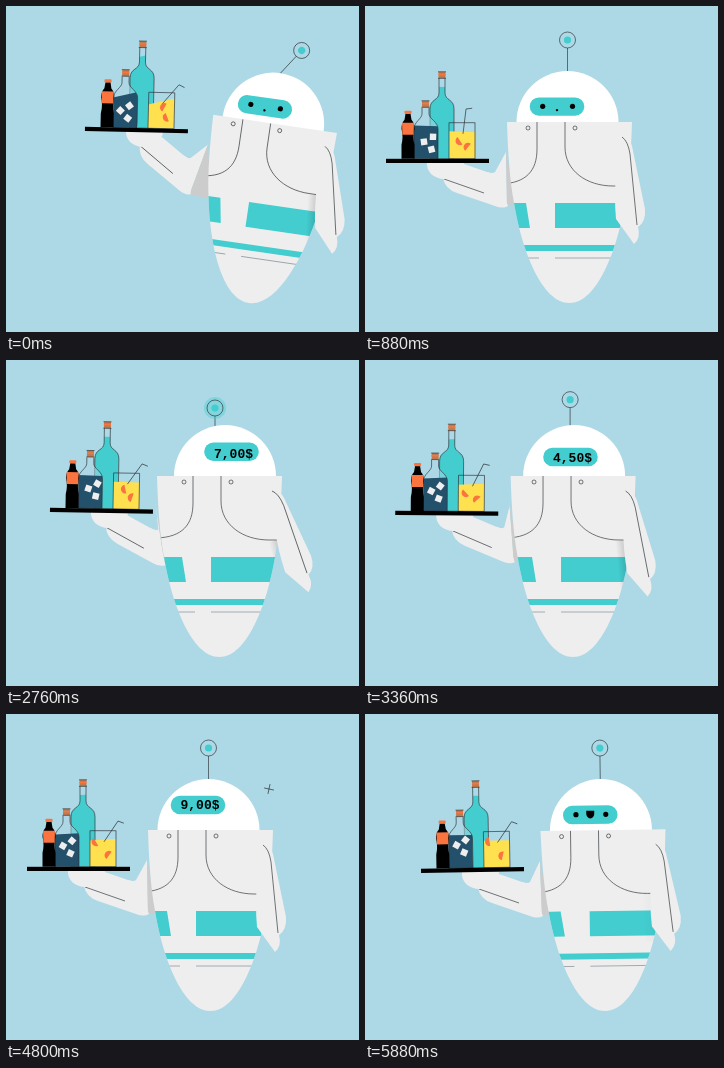
An HTML page that plays this animation: 353x326 px, repeating every 5.92 s.

```html
<!DOCTYPE html>
<html lang="en">
<head>
<meta charset="utf-8">
<title>Robot waiter</title>
<style>
  html, body { margin: 0; width: 100%; height: 100%; overflow: hidden; background: #add8e6; }
  svg { display: block; width: 353px; height: 326px; }
  .line { fill: none; stroke: #2a2f33; stroke-width: .65; }
  .shell { fill: #eee; }
  .teal { fill: #43cdcf; }
  .orange { fill: #fa7440; }
  .cork { fill: #c07a50; }
  #price { font: bold 13px "Liberation Mono", "DejaVu Sans Mono", monospace; text-anchor: middle; }
</style>
</head>
<body>
<svg viewBox="0 0 353 326">
  <defs>
    <path id="bodyShape" d="M142 116H267C266 150 264 175 260 197C252 245 232 297 204.5 297C177 297 157 245 149 197C145 175 143 150 142 116Z"/>
    <path id="flaskShape" d="M36 -51V-45C36 -40 28 -37 28 -30V0H52V-30C52 -37 43 -40 43 -45V-51"/>
    <path id="bottleShape" d="M53 -81V-66C53 -58 44 -60 44 -50V0H68V-50C68 -60 59 -58 59 -66V-81"/>
    <g id="corkShape">
      <rect class="cork" x="-3.5" width="7" height="6.5"/>
      <rect class="orange" x="-3.5" y="2" width="7" height="1.5"/>
      <path class="line" d="M-4 0H4M-4 6.5H4"/>
    </g>
    <linearGradient id="shadeFill">
      <stop offset="0" stop-opacity="0"/><stop offset="1" stop-opacity=".2"/>
    </linearGradient>
    <clipPath id="bodyClip"><use href="#bodyShape"/></clipPath>
    <clipPath id="flaskClip"><use href="#flaskShape"/></clipPath>
    <clipPath id="bottleClip"><use href="#bottleShape"/></clipPath>
    <clipPath id="glassClip"><rect x="63" y="-36" width="26" height="36"/></clipPath>
  </defs>
  <rect width="353" height="326" fill="#add8e6"/>

  <path id="upperArm" class="shell"/>
  <path id="armShade" fill="#ccc"/>
  <g id="forearm">
    <path class="shell" d="M78 168L96 157L122 166Q127 168 130 167L143 200Q138 203 130 200L92 187Q80 183 78 172Z"/>
    <path class="line" d="M79 173L119 187"/>
  </g>
  <path id="hand" class="shell" d="M62 156H99C99 168 90 174 80 173C68 173 61 165 62 156Z"/>

  <g id="tray">
    <g clip-path="url(#bottleClip)"><rect id="bottleLiquid" class="teal" x="36" y="-72" width="40" height="90"/></g>
    <use href="#bottleShape" class="line"/>
    <use href="#corkShape" x="56" y="-87"/>

    <g clip-path="url(#flaskClip)">
      <rect x="28" y="-52" width="24" height="52" fill="#add8e6" opacity=".5"/>
      <rect id="flaskLiquid" x="18" y="-33" width="44" height="50" fill="#23506a"/>
    </g>
    <g id="ice" fill="#eee"></g>
    <use href="#flaskShape" class="line"/>
    <use href="#corkShape" x="39.5" y="-58"/>

    <path d="M19.5 -45H24.5L25.5 -39Q28.5 -36 28.5 -30Q26.5 -22 28.5 -14V0H15.5V-14Q17.5 -22 15.5 -30Q15.5 -36 18.5 -39Z"/>
    <rect class="orange" x="18.5" y="-48" width="7" height="3.2" rx=".8"/>
    <path class="orange" d="M16 -36H28L27.6 -24H16.4Z"/>

    <g clip-path="url(#glassClip)">
      <rect id="juice" x="53" y="-27" width="46" height="50" fill="#ffe14f"/>
      <path id="sliceA" class="orange" d="M-4 -2A4.2 4.2 0 0 0 4 2Z"/>
      <path id="sliceB" class="orange" d="M-4 2A4.2 4.2 0 0 1 4 -2Z"/>
    </g>
    <path id="straw" class="line" d="M0 0V-25L6 -26.5"/>
    <rect class="line" x="63" y="-36" width="26" height="36"/>
    <rect width="103" height="4.2"/>
  </g>

  <g id="robot">
    <g id="antenna">
      <path class="line" d="M202.5 70V42"/>
      <circle id="halo" class="teal" cx="202.5" cy="34"/>
      <circle class="line" cx="202.5" cy="34" r="8"/>
      <circle class="teal" cx="202.5" cy="34" r="3.6"/>
    </g>
    <path id="head" fill="#fff" d="M151.5 117V116A51 51 0 0 1 253.5 116V117Z"/>
    <g id="panel">
      <rect class="teal" x="-27.3" y="-9.2" width="54.6" height="18.4" rx="9.2"/>
      <g id="eyes"><circle cx="-14.3" cy="-.3" r="2.6"/><circle cx="15.5" cy="-.3" r="2.6"/></g>
      <path id="closedEyes" class="line" style="stroke-width:1.3" d="M-17 .3H-12M13 .3H18"/>
      <circle id="dotMouth" cy="3.5" r="1.2"/>
      <path id="smile" d="M-4 -4H4V-1A4 4.6 0 0 1 -4 -1Z"/>
      <text id="price" x="2"></text>
    </g>
    <g id="body">
      <use href="#bodyShape" class="shell"/>
      <g clip-path="url(#bodyClip)">
        <g id="front">
          <path class="teal" d="M130 197H161L165 222H130ZM190 197H280V222H190Z"/>
          <path class="line" style="stroke:#74878e" d="M130 252H174M190 252H280"/>
          <path class="line" d="M172 116V143C172 165 161 177 136 178M200 116V141C200 165 222 180 248 180H270"/>
          <circle class="line" cx="163" cy="122" r="2"/>
          <circle class="line" cx="210" cy="122" r="2"/>
        </g>
        <rect class="teal" x="140" y="239" width="130" height="6"/>
        <rect id="armShadow" x="242" y="180" width="12" height="48" fill="url(#shadeFill)"/>
      </g>
      <g id="rightArm">
        <path class="shell" d="M252 131Q264 128 267 140L280 203Q281 216 273 221Q276 232 269 238L251 213Q249 190 251 170Z"/>
        <path class="line" d="M257 131Q263 135 265 148L272 219"/>
      </g>
    </g>
  </g>

  <path id="minus" class="line" d="M-5 0H5"/>
  <g id="divide" class="teal">
    <rect x="-5" y="-.6" width="10" height="1.2"/><circle cy="-3.5" r="1.2"/><circle cy="3.5" r="1.2"/>
  </g>
  <path id="plus" class="line" d="M-5 0H5M0 -5V5"/>
  <path id="smallPlus" class="line" style="stroke:#43cdcf" d="M-5 0H5M0 -5V5"/>
</svg>
<script>
const LOOP = 5920;
const $ = id => document.getElementById(id);
const place = (id, transform) => $(id).setAttribute('transform', transform);
const show = (id, on) => { $(id).style.display = on ? '' : 'none'; };
const inOut = p => p < .5 ? 4 * p ** 3 : 1 - 4 * (1 - p) ** 3;
const smooth = p => p * p * (3 - 2 * p);
const ramp = (t, from, to) => Math.min(1, Math.max(0, (t - from) / (to - from)));

// Eased track through alternating time, value pairs
const track = (...keys) => t => {
  let i = 0;
  while (i + 4 < keys.length && t >= keys[i + 2]) i += 2;
  return keys[i + 1] + (keys[i + 3] - keys[i + 1]) * smooth(ramp(t, keys[i], keys[i + 2]));
};

const entrance = {
  bodyX: track(0, 38.5, 340, -10, 640, 0),
  tilt: track(0, 8.3, 340, -3, 640, .3, 840, 0),
  trayX: track(0, 58, 380, -21, 840, 0),
  trayY: track(0, -32, 340, 3, 640, 0),
  trayTilt: track(0, 1.3, 340, -2, 700, 0),
  elbow: track(0, 21, 340, -3, 720, 0),
  arm: track(0, -5.7, 340, 5, 660, -4, 880, 0),
  antenna: track(0, 34.7, 300, -26, 560, 9, 800, 0)
};
const straw = track(0, 40, 360, -8, 880, 7, 1500, 30, 2080, 35, 2760, 35, 3680, 23, 4800, 34, 5880, 35);
const slosh = track(0, -14, 300, 14, 600, -7, 880, 2, 1300, -4, 2080, -4, 2760, 1, 3680, -4, 4800, -3, 5880, 0);
const iceX = track(0, -3, 880, 0, 2080, -2, 2760, 0, 3680, -3, 4800, -2, 5880, -2);
const iceY = track(0, 0, 880, 0, 2080, -4, 2760, -3, 3680, -3, 4800, -4, 5880, -6);
const iceTurn = track(0, 42, 880, -8, 2760, 18, 3680, 30, 5880, 30);
const sliceX = track(0, 79, 880, 74, 2080, 76, 2760, 75, 3680, 69, 5880, 69);
const sliceY = track(0, -21, 880, -18, 2760, -20, 3680, -18, 4800, -25, 5880, -26);
const sliceTurn = track(0, 60, 880, 0, 2760, 20, 3680, -20, 5880, 25);
const leanSettle = track(3640, 0, 3740, -.03, 4000, 0);
const lookUp = track(4160, 0, 4500, -9.6, 5040, -9.6, 5400, 0);

const pulses = [1280, 2480, 4000, 4880];
const prices = [[2440, '7,00$'], [3280, '4,50$'], [4240, '9,00$'], [5240, '']];
const cubes = [[38, -17, 0], [47, -22, 10], [45.5, -9.5, -6]];
$('ice').innerHTML = cubes.map((_, i) =>
  `<rect id="cube${i}" x="-3.2" y="-3.2" width="6.4" height="6.4"/>`).join('');

const symbols = [
  { id: 'minus', x: 155, y: 26.5, turn: 0, from: 3400, to: 4400 },
  { id: 'divide', x: 234, y: 44, turn: -45, from: 3560, to: 4700 },
  { id: 'plus', x: 263, y: 75, turn: 12, from: 3480, to: 5200 },
  { id: 'smallPlus', x: 187, y: 30, turn: 0, from: 3960, to: 4840 }
];

function draw(t) {
  const away = (from, to) => inOut(ramp(t, from, to)) - inOut(ramp(t, 3040, 3640)) + leanSettle(t);
  const lean = away(1830, 2430);
  const lead = away(1800, 2400);
  const windUp = Math.sin(Math.PI * ramp(t, 5420, 5620));
  const exit = ramp(t, 5560, 5880) ** 2;
  const pose = {};
  for (const name in entrance) pose[name] = entrance[name](t);

  const bodyX = pose.bodyX + 36 * exit - 3 * windUp;
  const tilt = pose.tilt - .8 * exit;
  const trayX = pose.trayX + 23 * lean + 35 * exit - 4 * windUp;
  const trayY = pose.trayY - 5 * lean + 2 * exit;
  const elbow = pose.elbow + 9.7 * lean;
  const arm = pose.arm - 13.4 * lead - .8 * exit;

  place('robot', `translate(${bodyX} 0) rotate(${tilt} 204.5 297)`);
  place('antenna', `translate(${6.5 * lean} ${14 * lean}) rotate(${pose.antenna} 202.5 65)`);
  place('head', `translate(${16.5 * lean} 0)`);
  place('panel', `translate(${192 + 33.5 * lean} ${100.6 - 8.8 * lead + lookUp(t)})`);
  place('body', `translate(${9 * lean} 0)`);
  place('front', `translate(${6 * lean} 0)`);
  place('rightArm', `rotate(${arm} 257 131)`);
  place('armShadow', `rotate(${arm} 257 131)`);
  $('armShadow').setAttribute('opacity', Math.min(1, Math.abs(arm) / 5));
  place('forearm', `translate(${trayX} ${trayY}) rotate(${elbow} 80 166)`);
  place('hand', `translate(${trayX} ${trayY})`);
  place('tray', `translate(${21 + trayX} ${152.8 + trayY}) rotate(${pose.trayTilt + lean - exit})`);

  // Join the tray arm to the moving shoulder
  const turn = (x, y, cx, cy, deg, dx, dy) => {
    const a = deg * Math.PI / 180, c = Math.cos(a), s = Math.sin(a);
    return [cx + dx + (x - cx) * c - (y - cy) * s, cy + dy + (x - cx) * s + (y - cy) * c];
  };
  const onBody = (x, y) => turn(x + 9 * lean, y, 204.5, 297, tilt, bodyX, 0);
  const onArm = (x, y) => turn(x, y, 80, 166, elbow, trayX, trayY);
  const shoulder = onBody(141, 146), tip = onArm(142, 200);
  $('upperArm').setAttribute('d', `M${onArm(122, 166)}Q${onArm(128, 168)} ${onArm(130, 166)}L${shoulder}L${tip}L${onArm(130, 195)}Z`);
  $('armShade').setAttribute('d', `M${shoulder}L${onBody(152, 200)}L${tip}Z`);

  const level = slosh(t);
  place('bottleLiquid', `rotate(${level} 56 -72)`);
  place('flaskLiquid', `rotate(${level} 40 -33)`);
  place('juice', `rotate(${level} 76 -27)`);
  place('straw', `translate(77 -25) rotate(${straw(t)})`);
  cubes.forEach(([x, y, r], i) =>
    place('cube' + i, `translate(${x + iceX(t)} ${y + iceY(t)}) rotate(${r + iceTurn(t)})`));
  place('sliceA', `translate(${sliceX(t)} ${sliceY(t)}) rotate(${sliceTurn(t) + 30})`);
  place('sliceB', `translate(82 -11.5) rotate(${-sliceTurn(t) - 25})`);

  const start = pulses.find(p => t >= p && t < p + 540);
  const wave = start === undefined ? 1 : (t - start) / 540;
  $('halo').setAttribute('r', 8 + 6 * wave);
  $('halo').setAttribute('opacity', .8 * (1 - wave));

  const price = prices.reduce((label, [at, text]) => t >= at ? text : label, '');
  const smiling = t >= 1500;
  const closed = (t >= 1320 && t < 1440) || (t >= 1880 && t < 2440);
  $('price').textContent = price;
  $('price').setAttribute('y', 4.4 + 2 * lean);
  show('eyes', !price && !closed);
  show('closedEyes', !price && closed);
  show('dotMouth', !price && !smiling);
  show('smile', !price && smiling);

  for (const { id, x, y, turn, from, to } of symbols) {
    const size = smooth(ramp(t, from, from + 160)) - smooth(ramp(t, to - 160, to));
    place(id, `translate(${x} ${y}) rotate(${turn}) scale(${size})`);
    show(id, size > 0);
  }
}

const origin = performance.now();
function tick() {
  draw((performance.now() - origin) % LOOP);
  requestAnimationFrame(tick);
}
tick();
</script>
</body>
</html>
```
